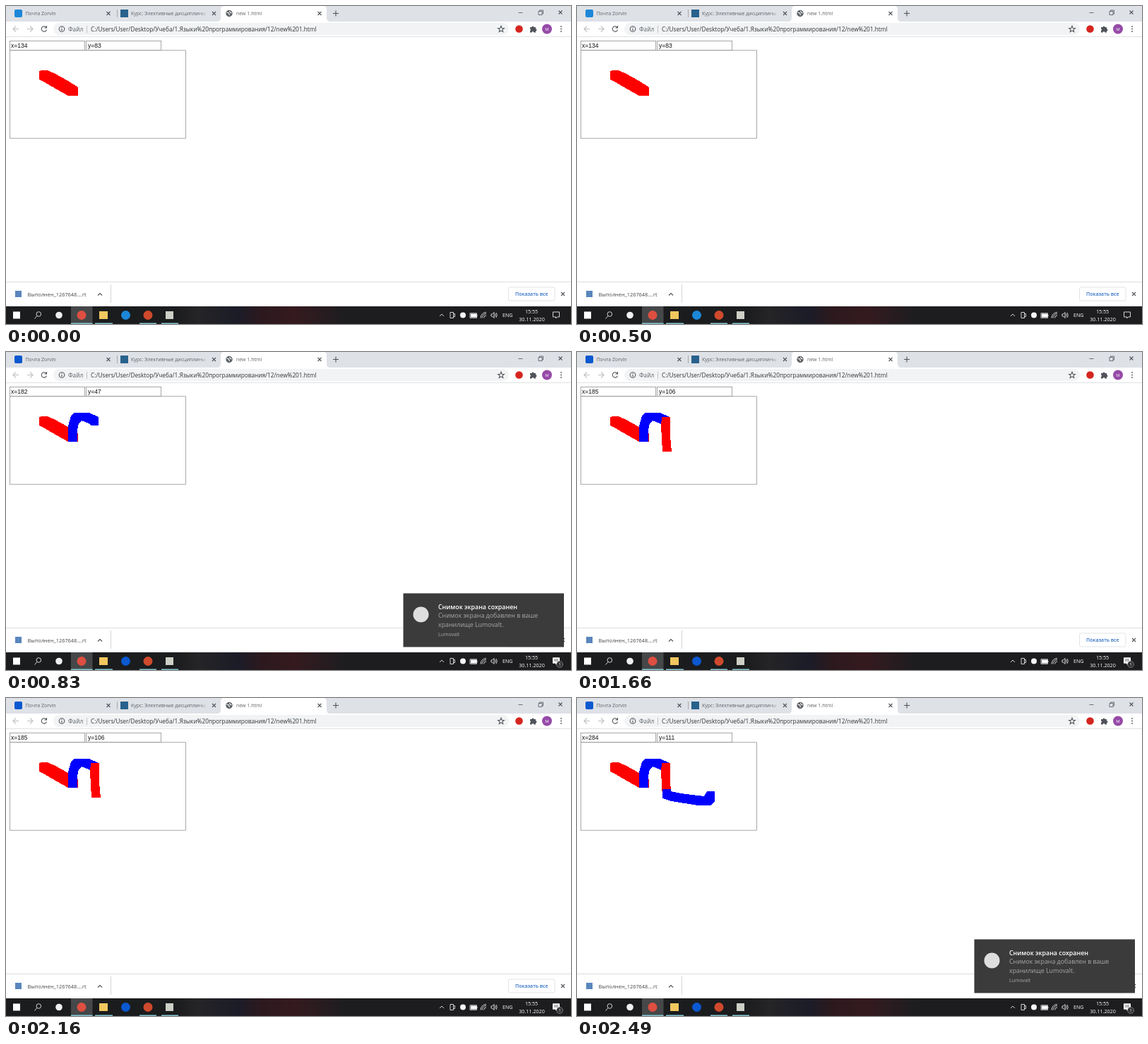
Write an HTML page that moves like this. It is 800x450 px and loops after 3.32 s.

```html
<!DOCTYPE html>
<html lang="ru">
<head>
<meta charset="utf-8">
<style>
html, body { margin: 0; width: 100%; height: 100%; overflow: hidden; background: #fff; }
svg { display: block; width: 800px; height: 450px; }
text { font: 7px "Open Sans", "Noto Sans", sans-serif; fill: #5f6368; white-space: pre; }
.url { font-size: 8.27px; }
.field { font: 8.5px "Liberation Sans", Arial, sans-serif; fill: #111; }
.note text { font-size: 8.85px; fill: #a8a8a8; }
.task text { font-size: 7.15px; fill: #fff; }
.line { fill: none; stroke: #50545a; stroke-width: 1.1; }
.task .line { stroke: #e8e8e8; stroke-width: .9; }
.box { fill: #fff; stroke: #929292; stroke-width: .8; }
.pen { shape-rendering: crispEdges; }
</style>
</head>
<body>
<svg viewBox="0 0 800 450">
  <defs>
    <path id="cross" d="M-2.5-2.5l5 5m0-5l-5 5"/>
    <path id="chevron" d="M-3 1.5l3-3 3 3"/>
    <linearGradient id="fade" gradientUnits="userSpaceOnUse" x1="272" x2="287" y1="0" y2="0">
      <stop stop-color="#dee1e6" stop-opacity="0"/><stop offset="1" stop-color="#dee1e6"/>
    </linearGradient>
    <linearGradient id="bar">
      <stop offset=".3" stop-color="#1b1c1e"/><stop offset=".34" stop-color="#252426"/>
      <stop offset=".41" stop-color="#1b1c28"/><stop offset=".45" stop-color="#2b191e"/>
      <stop offset=".51" stop-color="#351a1f"/><stop offset=".6" stop-color="#1d1d20"/>
    </linearGradient>
  </defs>

  <!-- Tabs -->
  <rect width="800" height="22" fill="#dee1e6"/>
  <path d="M299 22q5 0 5-5V5q0-5 5-5h140q5 0 5 5v12q0 5 5 5z" fill="#fff"/>
  <rect class="accent" x="12" y="5" width="11" height="11" rx="2"/>
  <text x="27.5" y="13">Почта Zorvin</text>
  <path d="M157.5 5v11" stroke="#9a9da2" stroke-width=".8"/>
  <rect x="162" y="5" width="11" height="11" fill="#28618c"/>
  <text x="177" y="13">Курс: Элективные дисциплины</text>
  <path d="M272 2h28v18h-28z" fill="url(#fade)"/>
  <circle cx="316" cy="10.5" r="4.7" fill="#5f6368"/>
  <path d="M312.5 9l3 1 1 3m0-6l1 2 2 1" class="line" style="stroke:#fff"/>
  <text x="326" y="13">new 1.html</text>
  <g class="line">
    <use href="#cross" x="145" y="10.5"/>
    <use href="#cross" x="294.5" y="10.5"/>
    <use href="#cross" x="444" y="10.5"/>
    <path d="M463 10.5h8m-4-4v8"/>
    <path d="M725.5 9.5h6M754 7.5h5v5h-5zM755.5 7.500v-1.5h5v5h-1.5" stroke-width=".8"/>
    <use href="#cross" x="785" y="9"/>
  </g>

  <!-- Toolbar -->
  <rect x="67" y="24" width="645" height="17" rx="8.5" fill="#f1f3f4"/>
  <path d="M0 43.5h800" stroke="#dfe1e4"/>
  <path class="line" style="stroke:#bdc0c4" d="M18 32.5h-8m4-4l-4 4 4 4M30 32.5h8m-4-4l4 4-4 4"/>
  <path class="line" d="M57 30.3a3.7 3.7 0 1 0 .5 3.3M57.5 28v3h-3"/>
  <circle class="line" cx="79" cy="32.5" r="3.8"/>
  <path class="line" d="M79 30v1m0 1v3"/>
  <text class="url" x="88" y="35.7">Файл</text>
  <path d="M114.5 28v10" stroke="#b5b8bc" stroke-width=".8"/>
  <text class="url" x="120" y="35.7" style="fill:#33363a">C:/Users/User/Desktop/Учеба/1.Языки%20программирования/12/new%201.html</text>
  <path class="line" stroke-width=".9" d="M701 28.3l1.2 2.9 3.2.2-2.5 2 .8 3.2-2.7-1.7-2.7 1.7.8-3.2-2.5-2 3.2-.2z"/>
  <circle cx="726.5" cy="32.5" r="5.3" fill="#d5251f"/>
  <path d="M742 30h2.5a1.5 1.5 0 1 1 3 0h2.5v2.3a1.5 1.5 0 1 1 0 3v2.2h-2.5a1.5 1.5 0 0 0-3 0h-2.5v-2.5a1.5 1.5 0 0 0 0-2.8z" fill="#50545a"/>
  <circle cx="766" cy="32.5" r="7" fill="#964aa8"/>
  <text x="766" y="34.8" text-anchor="middle" style="fill:#fff;font-size:6px">M</text>
  <path d="M786 29v0m0 3.500v0m0 3.500v0" stroke="#50545a" stroke-width="1.8" stroke-linecap="round"/>

  <!-- Page -->
  <rect class="box" x="5.4" y="49.5" width="106.2" height="13"/>
  <rect class="box" x="113.4" y="49.5" width="106.2" height="13"/>
  <text class="field" id="fieldX" x="7" y="59"></text>
  <text class="field" id="fieldY" x="116" y="59"></text>
  <rect class="box" x="5.5" y="62.8" width="249" height="124.4"/>
  <g class="pen">
    <path data-on="0123" fill="#f00" d="M47 92l3-1h9l11 5 18 10 14 9v12H88l-16-9-19-11-6-3z"/>
    <path data-on="123" fill="#00f" d="M88 127v-22l4-15 4-4h22l13 6v12h-11l-3-3-10-4-4 4-2 9v17z"/>
    <path data-on="23" fill="#f00" d="M120 92h12v28l2 21h-13l-2-36z"/>
    <path data-on="3" fill="#00f" d="M121 129h12v3l14 3 16 2 17 2 4-7h11v14l-5 6h-19l-37-6-13-4z"/>
  </g>

  <!-- Downloads -->
  <path d="M0 390.5h800" stroke="#dcdee1"/>
  <path d="M148.5 394v26" stroke="#d4d6d9"/>
  <rect x="13" y="403" width="9" height="9" fill="#5a86bd"/>
  <text x="30.5" y="411" style="font-size:7.35px;fill:#44474b">Выполнен_1267648....rt</text>
  <use class="line" href="#chevron" x="133" y="408"/>
  <rect x="711.5" y="398" width="65.5" height="19" rx="2" fill="#fff" stroke="#dadce0" stroke-width=".8"/>
  <text x="721" y="410.2" style="font-weight:600;fill:#2f6fc4">Показать все</text>
  <use class="line" href="#cross" x="788.5" y="407.5"/>

  <!-- Notification -->
  <g class="note" data-on="13">
    <rect x="562.5" y="341.5" width="227.5" height="76" fill="#3b3b3b"/>
    <circle cx="587.5" cy="371.5" r="11" fill="#dedede"/>
    <text x="612" y="363.5" style="font-weight:600;fill:#fff">Снимок экрана сохранен</text>
    <text x="612" y="376.3">Снимок экрана добавлен в ваше</text>
    <text x="612" y="388.5">хранилище Lumovalt.</text>
    <text x="612" y="402.3" style="font-size:7px">Lumovalt</text>
  </g>

  <!-- Taskbar -->
  <g class="task">
    <rect y="425" width="800" height="25" fill="url(#bar)"/>
    <rect x="92" y="425" width="30.5" height="25" fill="#454749"/>
    <path d="M92 449.3h30.5m3.5 0h25m38 0h24m7 0h24" stroke="#83c5cf" stroke-width="1.4"/>
    <rect x="10" y="432.5" width="10" height="10" fill="#fff"/>
    <path class="line" d="M44 438.5l-3.5 4"/><circle class="line" cx="46.3" cy="436" r="3.3"/>
    <circle cx="75" cy="437.5" r="4.8" fill="#f0f0f0"/>
    <circle cx="107" cy="437.5" r="6.5" fill="#dd4f41"/>
    <rect x="132" y="432" width="12" height="11" fill="#f2c75f"/>
    <circle class="accent" cx="169.5" cy="437.5" r="6.5"/>
    <circle cx="201" cy="437.5" r="6.5" fill="#cf4a2c"/>
    <rect x="226" y="432" width="11" height="11" fill="#cdcfc6"/>
    <use class="line" href="#chevron" x="617" y="437.5"/>
    <path class="line" d="M629 433.5h4.5v8H629zM633.5 435.5h2v4h-2"/>
    <circle cx="647" cy="437.5" r="4" fill="#f4f6f8"/>
    <path d="M658 435.5h8v5h-8z" fill="#fff"/><path class="line" d="M657 434.8h9.5v6.5H657zM667 437v2"/>
    <path class="line" d="M674 441.5a6 6 0 0 1 6-6m-3.5 6a3.5 3.5 0 0 1 3.5-3.5m-8 3.5a8 8 0 0 1 8-8"/>
    <path class="line" d="M687 436h1.5l2.5-2.5v8l-2.5-2.5H687zM692.5 435.5q1.5 2 0 4m1.5-5.5q2.5 3.500 0 7"/>
    <text x="703" y="440">ENG</text>
    <text x="744" y="434.5" text-anchor="middle">15:55</text>
    <text x="744.5" y="446" text-anchor="middle">30.11.2020</text>
    <path class="line" d="M774.5 433h9v7h-3l-2 2v-2h-4z"/>
    <g data-on="123">
      <path d="M774 432.5h10v8h-3l-2 2v-2h-5z" fill="#fff"/>
      <path d="M776 435h6m-6 2h6" stroke="#333" stroke-width=".7"/>
      <circle cx="784" cy="442" r="4.5" fill="#333" stroke="#aaa" stroke-width=".6"/>
      <text x="784" y="444.2" text-anchor="middle" style="font-size:6px">1</text>
    </g>
  </g>
</svg>
<script>
const STEP = 830;
const points = [[134, 83], [182, 47], [185, 106], [284, 111]];
const fieldX = document.getElementById("fieldX");
const fieldY = document.getElementById("fieldY");
const parts = document.querySelectorAll("[data-on]");
const accents = document.querySelectorAll(".accent");
let shown = -1;

function show(step) {
  const [x, y] = points[step];
  fieldX.textContent = "x=" + x;
  fieldY.textContent = "y=" + y;
  for (const part of parts) part.style.display = part.dataset.on.includes(step) ? "" : "none";
  for (const accent of accents) accent.style.fill = step ? "#0b58d0" : "#1c87d8";
}

function tick() {
  const step = Math.floor(performance.now() / STEP) % points.length;
  if (step !== shown) show(shown = step);
  requestAnimationFrame(tick);
}
tick();
</script>
</body>
</html>
```
